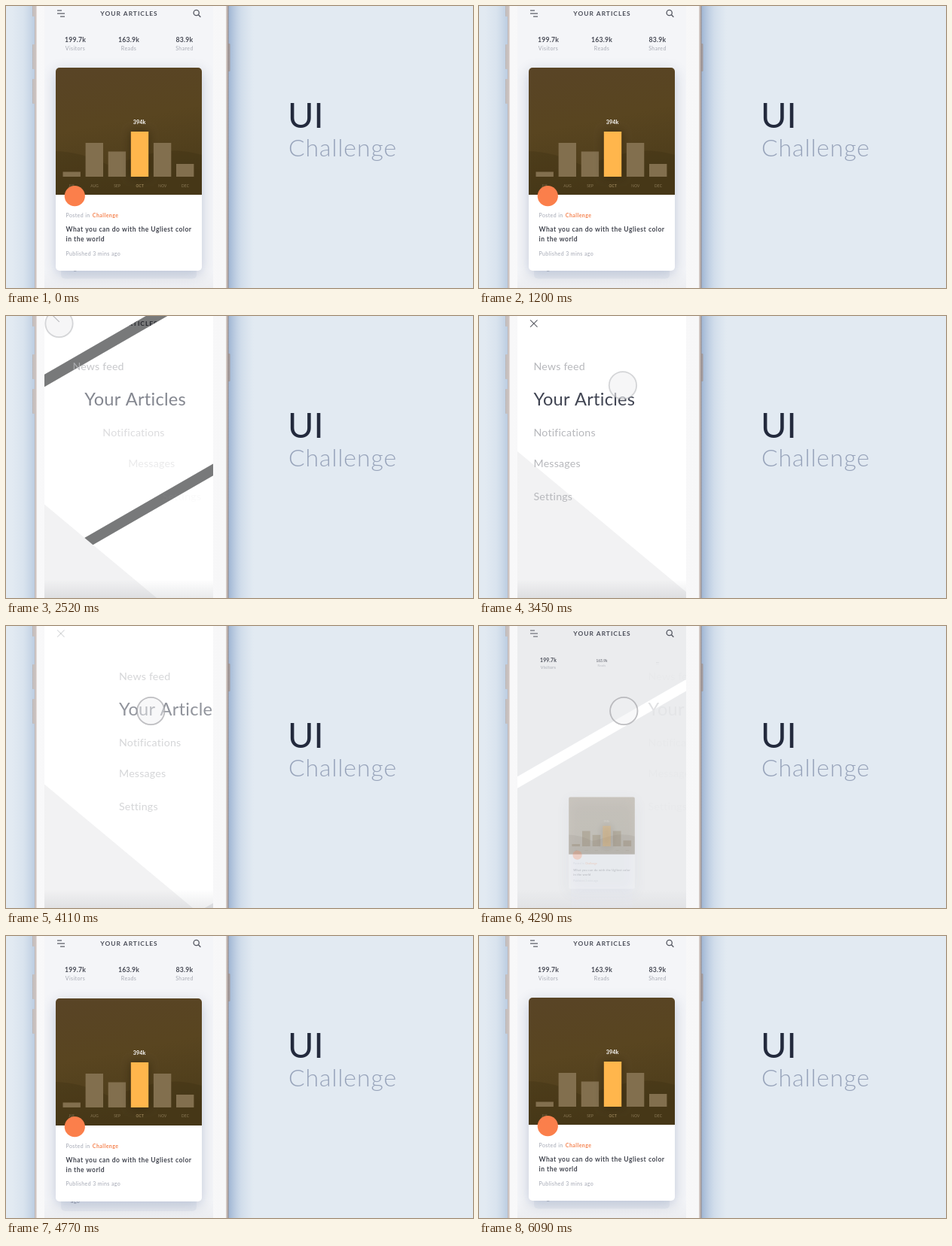
Animation of 620x375 px, one loop 6.12 s. Source, as an HTML page with a canvas:

```html
<!DOCTYPE html>
<html lang="en">
<head>
<meta charset="utf-8">
<title>UI Challenge</title>
<style>
  html, body { margin: 0; width: 100%; height: 100%; overflow: hidden; background: #e2eaf2; }
  canvas { display: block; width: 620px; height: 375px; }
</style>
</head>
<body>
<canvas id="stage"></canvas>
<script>
const W = 620, H = 375, LOOP = 6120;
const SCREEN = { x: 51, y: 0, w: 224, h: H };
const SLOPE = Math.tan(Math.PI / 6);
const canvas = document.getElementById('stage');
const ctx = canvas.getContext('2d');
const dpr = window.devicePixelRatio || 1;
canvas.width = W * dpr;
canvas.height = H * dpr;

const clamp = v => Math.min(1, Math.max(0, v));
const span = (t, a, b) => clamp((t - a) / (b - a));
const lerp = (a, b, k) => a + (b - a) * k;
const easeOut = u => 1 - (1 - u) ** 3;
const easeInOut = u => u < .5 ? 4 * u ** 3 : 1 - 4 * (1 - u) ** 3;

function rect(x, y, w, h, fill) {
  ctx.fillStyle = fill;
  ctx.fillRect(x, y, w, h);
}

function rounded(x, y, w, h, r, fill) {
  ctx.fillStyle = fill;
  ctx.beginPath();
  ctx.roundRect(x, y, w, h, r);
  ctx.fill();
}

function poly(points, fill) {
  ctx.beginPath();
  points.forEach(([x, y]) => ctx.lineTo(x, y));
  ctx.closePath();
  if (fill) { ctx.fillStyle = fill; ctx.fill(); }
}

function line(x1, y1, x2, y2, color, width = 1.2) {
  ctx.strokeStyle = color;
  ctx.lineWidth = width;
  ctx.beginPath();
  ctx.moveTo(x1, y1);
  ctx.lineTo(x2, y2);
  ctx.stroke();
}

function gradient(x1, y1, x2, y2, ...stops) {
  const g = ctx.createLinearGradient(x1, y1, x2, y2);
  stops.forEach((c, i) => g.addColorStop(i / (stops.length - 1), c));
  return g;
}

function text(str, x, y, size, weight, color, spacing = 0, align = 'left') {
  ctx.font = `${weight} ${size}px Lato, "Open Sans", sans-serif`;
  ctx.letterSpacing = spacing + 'px';
  ctx.textAlign = align;
  ctx.fillStyle = color;
  ctx.fillText(str, x, y);
}

// Runs draw inside a saved state, scaled about (cx, cy) and faded.
function group(cx, cy, scale, alpha, draw, dy = 0) {
  if (scale <= 0 || alpha <= 0) return;
  ctx.save();
  ctx.globalAlpha *= alpha;
  ctx.translate(cx, cy + dy);
  ctx.scale(scale, scale);
  ctx.translate(-cx, -cy);
  draw();
  ctx.restore();
}

function drawBackdrop() {
  rect(0, 0, W, H, '#e2eaf2');
  rect(8, 0, 30, H, gradient(8, 0, 38, 0, 'rgba(190,207,227,0)', 'rgba(190,207,227,.25)', 'rgba(178,197,220,.8)'));
  rect(295, 0, 34, H, gradient(295, 0, 329, 0, 'rgba(150,174,207,.9)', 'rgba(175,195,220,.35)', 'rgba(190,207,227,0)'));
  for (const [y, h] of [[-4, 18], [51, 33], [97, 33]])
    rounded(35, y, 4, h, 1, gradient(35, 0, 39, 0, '#b9b3b3', '#d8d2d0'));
  rounded(294, 50, 3.5, 37, 1, '#a49c9d');
  rect(38, 0, 4, H, gradient(38, 0, 42, 0, '#b8afae', '#dcd3d0', '#efebea'));
  rect(291, 0, 4.5, H, gradient(291, 0, 295.5, 0, '#ebe6e4', '#cbbfba', '#918788'));
  rect(41, 0, 251, H, gradient(41, 0, 292, 0, '#f8f8f9', '#fafafb', '#f7f7f8'));
  text('UI', 374, 162, 47, 400, '#232a3d');
  text('Challenge', 375, 199.5, 32, 300, '#97a3ba', .9);
}

function drawHeader() {
  const ink = '#555862';
  line(68, 6, 74, 6, ink);
  line(68, 10, 78, 10, ink);
  line(72, 14, 78, 14, ink);
  text('YOUR ARTICLES', 163.5, 12.6, 8.4, 700, '#4a4d58', 1, 'center');
  ctx.strokeStyle = ink;
  ctx.lineWidth = 1.3;
  ctx.beginPath();
  ctx.arc(252.7, 9, 3.6, 0, 7);
  ctx.stroke();
  line(255.3, 11.6, 258.4, 14.7, ink, 1.4);
}

function drawChart() {
  rect(66, 82, 194, 169, gradient(66, 82, 100, 251, '#594426', '#594520', '#4c3c1a'));
  ctx.fillStyle = 'rgba(48,36,10,.2)';
  ctx.beginPath();
  ctx.moveTo(66, 193);
  ctx.quadraticCurveTo(100, 194, 135, 211);
  ctx.bezierCurveTo(175, 205, 205, 182, 260, 198);
  ctx.lineTo(260, 251);
  ctx.lineTo(66, 251);
  ctx.fill();

  const tops = [220.5, 182, 193.5, 167, 182, 210];
  const months = ['JUL', 'AUG', 'SEP', 'OCT', 'NOV', 'DEC'];
  tops.forEach((y, i) => {
    const x = 75.5 + i * 30.1, peak = i === 3;
    ctx.save();
    if (peak) {
      ctx.shadowColor = 'rgba(35,25,5,.55)';
      ctx.shadowBlur = 12 * dpr;
    }
    rect(x, y, 23.4, 227 - y, peak ? '#ffb64c' : '#826f4e');
    ctx.restore();
    text(months[i], x + 12, 240.5, 4.8, 400, peak ? '#b39a6c' : '#8b7a58', .2, 'center');
  });
  text('394k', 177, 157, 7.2, 700, '#fff', .1, 'center');
}

function drawCard() {
  ctx.save();
  ctx.shadowColor = 'rgba(85,105,150,.32)';
  ctx.shadowBlur = 18 * dpr;
  ctx.shadowOffsetY = 5 * dpr;
  rounded(66, 82, 194, 270, 5, '#fff');
  ctx.restore();
  ctx.save();
  ctx.beginPath();
  ctx.roundRect(66, 82, 194, 169, [5, 5, 0, 0]);
  ctx.clip();
  drawChart();
  ctx.restore();

  ctx.fillStyle = '#fb7f4b';
  ctx.beginPath();
  ctx.arc(91.3, 252.7, 13.6, 0, 7);
  ctx.fill();
  text('Posted in', 79.5, 281, 7, 400, '#a3a7b3', .4);
  text('Challenge', 114.8, 281, 7, 700, '#f58350', .45);
  text('What you can do with the Ugliest color', 79.5, 300, 8.5, 700, '#42454f', .52);
  text('in the world', 79.5, 313, 8.5, 700, '#42454f', .52);
  text('Published 3 mins ago', 79.5, 331.5, 7, 400, '#a3a7b3', .4);
}

function drawBackCard() {
  rounded(73, 180, 180, 182.5, 5, '#e9ecf2');
  text('ago', 86, 352, 7, 400, '#8d919d', .4);
}

const STATS = [['199.7k', 'Visitors', 92], ['163.9k', 'Reads', 163], ['83.9k', 'Shared', 237]];

function drawContent(t) {
  const out = span(t, 2325, 2480);
  const closing = t > 3000;
  const gone = closing ? 0 : out;
  if (gone === 1) return;

  STATS.forEach(([value, label, x], i) => {
    const u = closing ? span(t, 4132 + 68 * i, 4532 + 68 * i) : 1;
    group(x, 49, easeOut(u) * (1 - .5 * gone), clamp(u * 3) * (1 - gone), () => {
      text(value, x, 48, 8.7, 700, '#484b56', .2, 'center');
      text(label, x, 58.6, 7, 400, '#a6a9b2', .4, 'center');
    });
  });

  const u = closing ? span(t, 4200, 4700) : 1;
  const drop = closing ? 107 * (1 - span(t, 4200, 4922)) ** 3 : 60 * gone * gone;
  const scale = easeOut(u) * (1 - .55 * gone);
  const alpha = clamp(u * 1.4) * (1 - gone);
  group(163, 217, scale, alpha, drawBackCard, closing ? drop * (1 + 2.4 * u) : drop);
  group(163, 217, scale, alpha, drawCard, drop);
}

function drawArticles(t) {
  const fresh = t > 3000 ? span(t, 4200, 4500) : 1;
  ctx.save();
  ctx.globalAlpha = lerp(.66, 1, fresh);
  const c = v => Math.round(lerp(v - 22, v, fresh));
  rect(SCREEN.x, 0, SCREEN.w, H, `rgb(${c(244)},${c(245)},${c(248)})`);
  ctx.restore();
  drawHeader();
  drawContent(t);
}

// Slanted strip; top and bottom are heights at the left screen edge.
function strip(top, bottom) {
  const { x, w } = SCREEN, rise = w * SLOPE;
  poly([[x, top], [x + w, top - rise], [x + w, bottom - rise], [x, bottom]]);
}

const MENU = [['News feed', 72], ['Your Articles', 119], ['Notifications', 160], ['Messages', 201], ['Settings', 245]];

function drawMenu(t) {
  const leave = span(t, 3960, 4260);
  const sink = 330 * (1 - span(t, 2340, 2790)) ** 3 + 240 * leave ** 3;
  const { x, w } = SCREEN;
  poly([[x, 180 + sink], [x + w, 367 + sink], [x + w, H + 400], [x, H + 400]], '#f2f2f3');

  MENU.forEach(([label, y], i) => {
    const start = 2357 + i * 38;
    const u = span(t, start, start + 310);
    const shift = 152 * ((1 - u) ** 3 + easeInOut(leave));
    ctx.globalAlpha = (1 - (1 - u) ** 2) * lerp(1, .16, leave);
    if (i === 1) text(label, 72.5 + shift, y, 23.6, 400, '#414553', .25);
    else text(label, 72.5 + shift, y, 14.2, 400, '#b7b8bc', .2);
  });

  // The two strokes of the cross slide in one after the other.
  const fade = 1 - span(t, 3980, 4150);
  [1, -1].forEach((side, i) => {
    const u = span(t, 2420 + 90 * i, 2640 + 90 * i);
    const d = 23 * (1 - u) ** 2;
    ctx.globalAlpha = clamp(u * 2.5) * fade;
    line(72.8 - side * (d + 4.7), 5.3 - d, 72.8 + side * (4.7 - d), 14.7 - d, '#5c5e66', 1.1);
  });
  ctx.globalAlpha = 1;
}

function drawOpening(t) {
  const p = easeInOut(span(t, 2320, 2590)), q = 1 - p;
  drawArticles(t);
  rect(SCREEN.x, 0, SCREEN.w, H, `rgba(0,0,0,${.54 * p})`);
  ctx.fillStyle = '#fff';
  strip(-300, 86 - 124 * q);
  ctx.fill();
  strip(210 - 124 * p, 210 + 124 * p);
  ctx.fill();
  strip(334 + 112 * q + 120 * q ** 3, 900);
  ctx.fill();
  drawMenu(t);
}

function drawClosing(t) {
  rect(SCREEN.x, 0, SCREEN.w, H, '#fff');
  drawMenu(t);
  const gap = 310 * (1 - easeInOut(span(t, 4030, 4350)));
  for (const [a, b] of [[-400, 208 - gap], [208 + gap, 1000]]) {
    ctx.save();
    strip(a, b);
    ctx.clip();
    drawArticles(t);
    ctx.restore();
  }
}

function drawCursor(t) {
  const show = easeOut(span(t, 1800, 2040)) * (1 - span(t, 4330, 4470));
  if (!show) return;
  const u = easeInOut(span(t, 3030, 3630));
  const x = lerp(70.5, 192.3, 1 - (1 - u) ** 2);
  const y = lerp(10, 113, u * u);
  const press = Math.max(span(t, 2150, 2250) - span(t, 2360, 2480), span(t, 3870, 3990));
  group(x, y, .5 + .5 * show, show, () => {
    ctx.beginPath();
    ctx.arc(x, y, 18.2, 0, 7);
    ctx.fillStyle = `rgba(240,240,242,${lerp(.62, .45, press)})`;
    ctx.fill();
    ctx.lineWidth = 1.8;
    ctx.strokeStyle = `rgba(165,166,170,${lerp(.45, .7, press)})`;
    ctx.stroke();
  });
}

function draw(t) {
  ctx.setTransform(dpr, 0, 0, dpr, 0, 0);
  drawBackdrop();
  ctx.save();
  ctx.beginPath();
  ctx.rect(SCREEN.x, SCREEN.y, SCREEN.w, SCREEN.h);
  ctx.clip();
  if (t < 2320 || t >= 4500) drawArticles(t);
  else if (t < 3000) drawOpening(t);
  else drawClosing(t);
  const shade = lerp(.03, .09, span(t, 2340, 2520) - span(t, 4050, 4350));
  rect(SCREEN.x, 350, SCREEN.w, 25, gradient(0, 350, 0, H, 'rgba(20,30,50,0)', `rgba(20,25,40,${shade})`));
  drawCursor(t);
  ctx.restore();
}

function tick() {
  draw(performance.now() % LOOP);
  requestAnimationFrame(tick);
}
tick();
</script>
</body>
</html>
```
